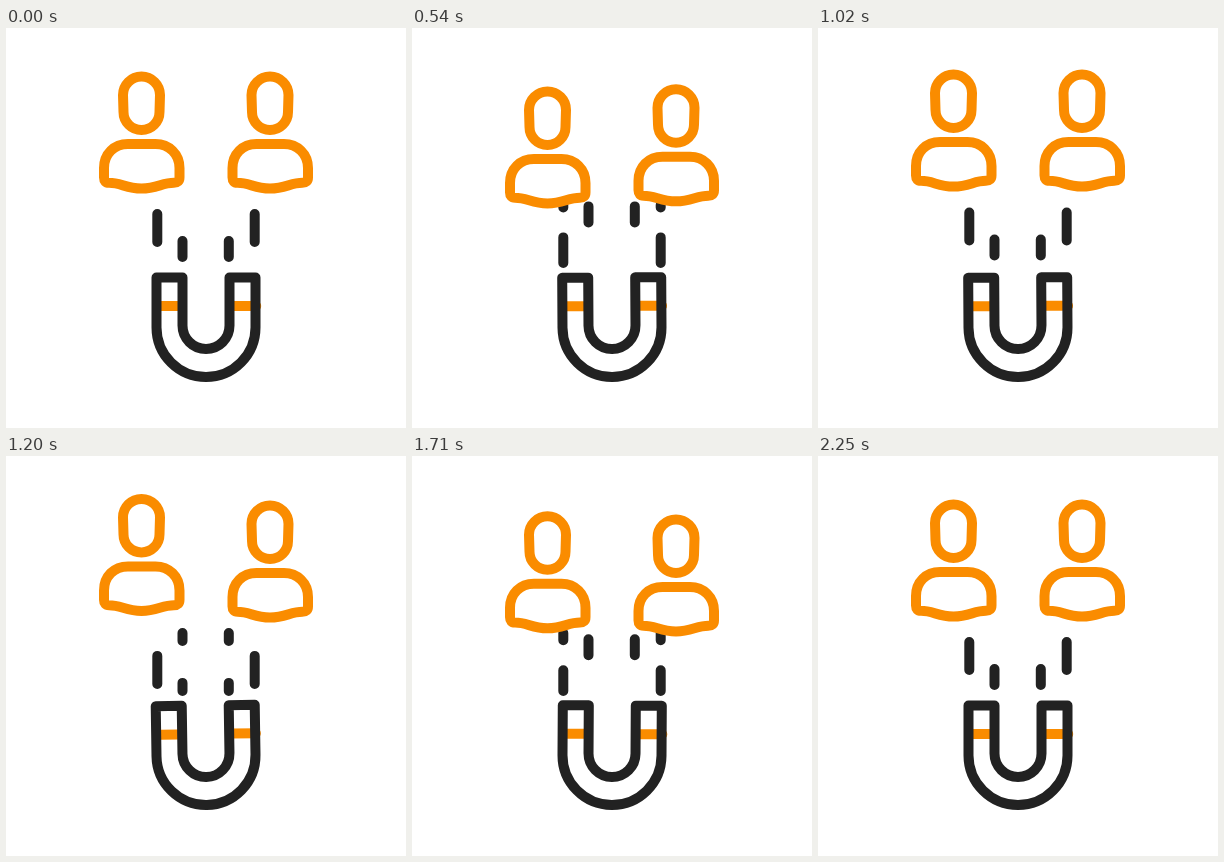
An HTML page for the animation above (2340 ms loop, 400 by 400 pixels).

```html
<!DOCTYPE html>
<html lang="en">
<head>
<meta charset="utf-8">
<title>Magnet attracting people</title>
<style>
  html, body { margin: 0; width: 100%; height: 100%; overflow: hidden; background: #fff; }
  svg { display: block; width: 100vw; height: 100vh; }
  path { fill: none; stroke-width: 10; stroke-linecap: round; stroke-linejoin: round; }
  .dark { stroke: #222; }
  .accent { stroke: #fa8c00; }
</style>
</head>
<body>
<svg viewBox="0 0 400 400">
  <defs>
    <g id="person" class="accent">
      <path d="M117 67a18.5 18.5 0 0 1 37 0l-.5 17a18 18 0 0 1-36 0z"/>
      <path d="M98 140C98 126 108 116 122 116H149.5C163 116 173.5 126 173.5 140V149.5Q173.5 154.8 168 154.8C156 154.8 151 160.5 135.5 160.5C120 160.5 115 154.8 103 154.8Q98 154.8 98 149.5Z"/>
    </g>
  </defs>
  <g class="dark">
    <path id="outer" stroke-dasharray="28 30" d="M151.3 177v58M248.7 177v58"/>
    <path id="inner" stroke-dasharray="16 42" d="M176.5 177v58M222.8 177v58"/>
  </g>
  <g id="magnet">
    <path class="accent" d="M155 278h17M227 278h23.2"/>
    <path class="dark" d="M150.5 249.5H176.5V297.5a23.5 23.5 0 0 0 47 0V249.5H249.5V299.5a49.5 49.5 0 0 1-99 0z"/>
  </g>
  <use id="left" href="#person"/>
  <use id="right" href="#person"/>
</svg>
<script>
  const LOOP = 2340, STEP = 30, LAST = 75, GAP = 58, TURN = 2 * Math.PI;
  const $ = id => document.getElementById(id);
  const smooth = u => u * u * (3 - 2 * u);

  // Turning points of each person's bobbing: [step, height].
  const leftBob = [[0, 0], [23, 17], [38, -6], [62, 14], [LAST, 0]];
  const rightBob = [[0, 0], [14, 16], [29, -2], [36, -2], [52, 17], [LAST, 0]];

  function bob(points, step) {
    const i = Math.max(1, points.findIndex(([s]) => s >= step));
    const [s0, y0] = points[i - 1], [s1, y1] = points[i];
    return y0 + (y1 - y0) * smooth((step - s0) / (s1 - s0));
  }

  // Two pulls per loop, each slowing down over two dash gaps.
  const flow = u => 2 * GAP * (1 - (1 - u * 2 % 1) ** 1.85);

  // Quick shake with a slightly uneven pace.
  const tilt = u => 1.35 * Math.sin(11 * TURN * u - 0.63 * Math.sin(TURN * u));

  function draw(now) {
    const step = Math.min(LAST, Math.floor(now % LOOP / STEP));
    const u = step / LAST;
    $('left').setAttribute('transform', `translate(0 ${bob(leftBob, step)})`);
    $('right').setAttribute('transform', `translate(128.5 ${bob(rightBob, step)})`);
    $('magnet').setAttribute('transform', `rotate(${tilt(u)} 200 300)`);
    $('outer').setAttribute('stroke-dashoffset', -(9 + flow(u)) % GAP);
    $('inner').setAttribute('stroke-dashoffset', -(36 + flow(u)) % GAP);
  }

  const start = performance.now();
  function tick() {
    draw(performance.now() - start);
    requestAnimationFrame(tick);
  }
  tick();
</script>
</body>
</html>
```
